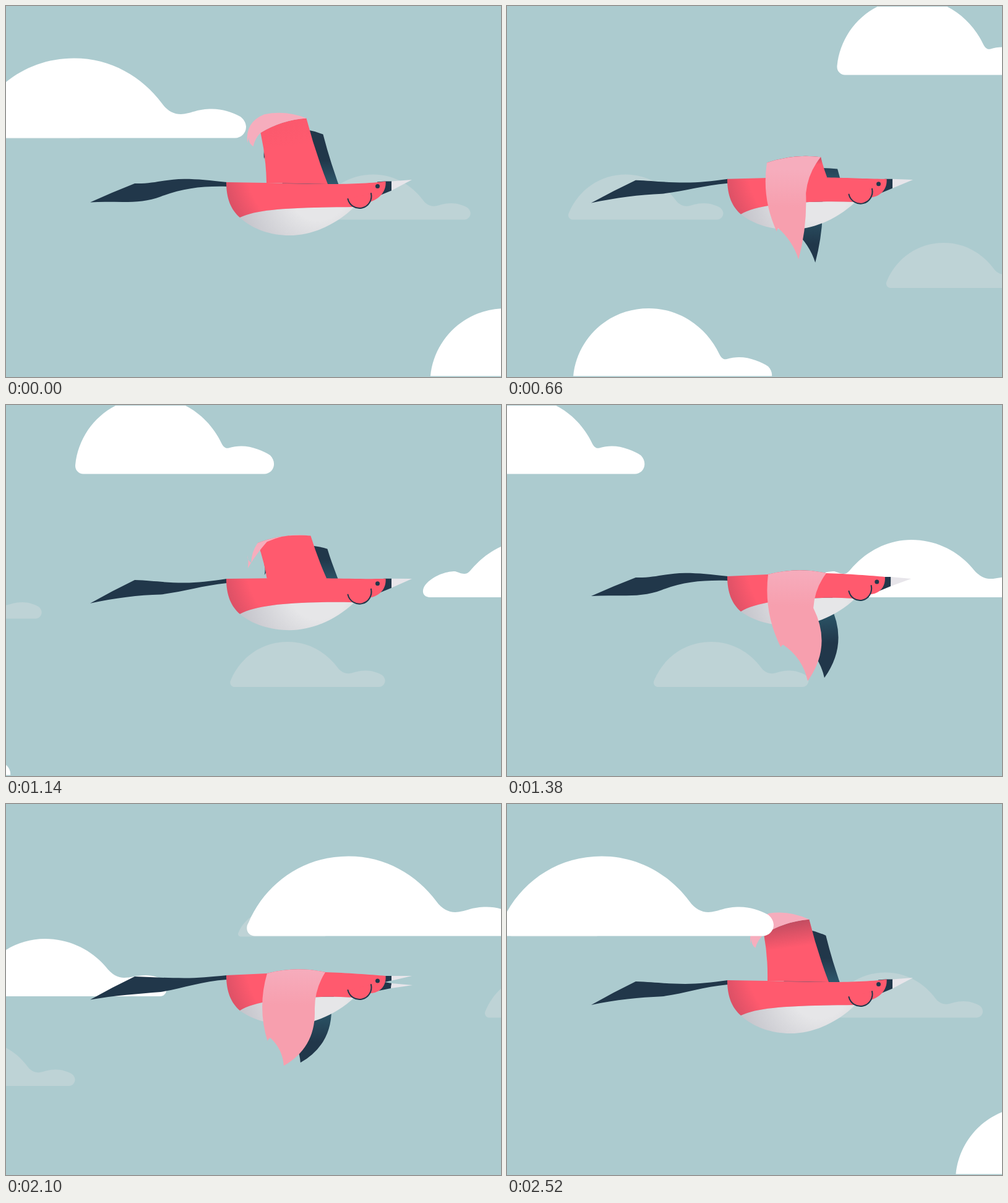
Write an HTML page that moves like this. It is 800 by 600 pixels and loops after 2550 ms.

```html
<!DOCTYPE html>
<html lang="en">
<head>
<meta charset="utf-8">
<title>Flying bird</title>
<style>
html, body { margin: 0; width: 100%; height: 100%; overflow: hidden; background: #accbcf; }
svg { display: block; width: 100vw; height: 100vh; }
</style>
</head>
<body>
<svg viewBox="0 0 800 600" xmlns="http://www.w3.org/2000/svg">
  <defs>
    <clipPath id="sky"><rect y="1" width="800" height="597.5"/></clipPath>
    <path id="long" d="M14 129C3 129-3 118 3 108C30 45 90 0 165 0C225 0 275 30 307 73C317 87 330 92 343 90C357 88 365 82 388 82C405 82 420 87 433 94C438 97 443 104 443 111C443 121 435 129 425 129Z"/>
    <path id="round" d="M13 124C5 124-1 117 0 109C6 50 55 0 122 0C172 0 215 30 236 74C240 82 244 83 248 82C254 80 262 79 268 79C286 79 305 87 315 94C319 98 321 103 321 108C321 117 314 124 305 124Z"/>
    <path id="twin" d="M-165 93C-178 93-180 80-170 70C-155 55-135 51-125 51C-118 52-108 60-100 50C-75 20-40 0 0 0C42 0 77 20 98 45C108 58 118 63 128 63C138 63 150 59 163 59C175 59 187 63 193 68C200 75 198 93 186 93Z"/>
    <radialGradient id="bodyRed" gradientUnits="userSpaceOnUse" cx="520" cy="250" r="185">
      <stop offset=".72" stop-color="#ff5a6e"/><stop offset="1" stop-color="#cf4d63"/>
    </radialGradient>
    <radialGradient id="bellyGrey" gradientUnits="userSpaceOnUse" cx="505" cy="300" r="134">
      <stop offset=".35" stop-color="#e6e6e8"/><stop offset="1" stop-color="#c3c3ca"/>
    </radialGradient>
    <linearGradient id="farNavy" gradientUnits="userSpaceOnUse" x1="0" y1="225" x2="0" y2="385">
      <stop offset=".15" stop-color="#21374a"/><stop offset=".42" stop-color="#2f5c70"/>
      <stop offset=".7" stop-color="#2b5567"/><stop offset="1" stop-color="#21374a"/>
    </linearGradient>
    <linearGradient id="topPink" gradientUnits="userSpaceOnUse" x1="0" y1="265" x2="0" y2="325">
      <stop offset="0" stop-color="#f6adbd"/><stop offset="1" stop-color="#f79fae"/>
    </linearGradient>
    <linearGradient id="foldShade" x1="0" y1="0" x2=".15" y2="1">
      <stop offset="0" stop-color="#a3465a"/><stop offset=".5" stop-color="#a3465a" stop-opacity="0"/>
    </linearGradient>
  </defs>
  <rect width="800" height="600" fill="#accbcf"/>
  <g id="back" clip-path="url(#sky)"></g>
  <g id="bird"></g>
  <g id="front" clip-path="url(#sky)"></g>
</svg>
<script>
const LOOP = 2550, STEP = 30, FLAP = 845, WAG = 450;
const NS = 'http://www.w3.org/2000/svg';
const NAVY = '#21374a', RED = '#ff5a6e', PALE = '#bed3d6', WHITE = '#fff';

function make(parent, tag, attrs) {
  const el = document.createElementNS(NS, tag);
  set(el, attrs);
  return document.getElementById(parent).appendChild(el);
}
function set(el, attrs) { for (const k in attrs) el.setAttribute(k, attrs[k]); }

const mix = (a, b, k) => a + (b - a) * k;
const mixPoint = (p, q, k) => [mix(p[0], q[0], k), mix(p[1], q[1], k)];
const mod = (a, n) => ((a % n) + n) % n;
const clamp = u => Math.min(1, Math.max(0, u));
const smooth = u => (u = clamp(u), u * u * (3 - 2 * u));
const speedUp = u => u * u;
const slowDown = u => 1 - (1 - u) ** 2;
// rises to 1 at a, falls from b
const pulse = (t, a, b, ramp) => smooth((t - a + ramp) / ramp) * smooth((b + ramp - t) / ramp);

// Clouds drift left at a steady speed and come round again; near ones take a longer lap
function cloud(layer, shape, fill, scale, y, x, speed) {
  const el = make(layer, 'use', { href: '#' + shape, fill });
  const span = speed * (layer === 'front' ? LOOP + 15 : LOOP), margin = 450;
  return t => {
    const left = mod(x - speed * t + margin, span) - margin;
    set(el, { transform: `translate(${left.toFixed(2)} ${y}) scale(${scale})` });
  };
}
const clouds = [
  cloud('back', 'long', PALE, .566, 272.5, 500, .608),
  cloud('back', 'long', PALE, .566, 383, 957, .522),
  cloud('back', 'long', PALE, .326, 172.5, 2227, .882),
  cloud('back', 'twin', WHITE, 1, 218, 1785, .82),
  cloud('front', 'round', WHITE, 1, 489, 686, .877),
  cloud('front', 'round', WHITE, 1, -12.5, 1113, .878),
  cloud('front', 'long', WHITE, 1, 84.5, -55, .954)
];

// Key poses. fold: ends of the crease; tip: crest, long feather, notch, short feather
const root = [[422, 274], [516, 272]];
const lift = { low: 0, shade: 1, fold: [[416, 212], [489, 188]],
  tip: [[425, 177], [394, 227], [396, 219], [402, 234]] };
const high = { low: 0, shade: -4, fold: [[392, 175], [470, 154]],
  tip: [[385, 168], [373, 196], [378, 183], [389, 198]] };
const sweep = { low: 1, shade: 0, fold: root,
  tip: [[501, 336], [429, 411], [417, 373], [412, 379]] };
const reach = { low: 1, shade: 1, fold: root,
  tip: [[495, 328], [487, 447], [447, 388], [443, 392]] };

// lag > 1 lets the feathers trail behind the fold
const stages = [
  { at: 0, pose: lift, ease: smooth, lag: 1 },
  { at: 90, pose: high, ease: smooth, lag: 1 },
  { at: 135, pose: high, ease: speedUp, lag: 1.6 },
  { at: 400, pose: sweep, ease: slowDown, lag: 1 },
  { at: 585, pose: reach, ease: smooth, lag: 1.6 },
  { at: FLAP, pose: lift }
];

function wingPose(t) {
  const s = (t + 25) % FLAP;
  const i = stages.findIndex(g => g.at > s), from = stages[i - 1], to = stages[i];
  const k = from.ease((s - from.at) / (to.at - from.at)), late = k ** from.lag;
  const a = from.pose, b = to.pose;
  return {
    low: mix(a.low, b.low, k),
    shade: clamp(mix(a.shade, b.shade, k)),
    fold: a.fold.map((p, n) => mixPoint(p, b.fold[n], k)),
    tip: a.tip.map((p, n) => mixPoint(p, b.tip[n], late))
  };
}

const part = fill => make('bird', 'path', { fill });
const far = part('url(#farNavy)'), tail = part(NAVY), collar = part(NAVY), beak = part('#e7e5ea');
const belly = part('url(#bellyGrey)'), body = part('url(#bodyRed)');
const smile = make('bird', 'path', { fill: RED, stroke: NAVY, 'stroke-width': 2, 'stroke-linecap': 'round' });
const eye = make('bird', 'ellipse', { fill: NAVY, rx: 3.5 });
const under = part(RED), shade = part('url(#foldShade)'), over = part('url(#topPink)');

// Curve from a to b, bowed sideways by a share of its length
function bow(a, b, k) {
  const dx = b[0] - a[0], dy = b[1] - a[1];
  const n = [a[0] + dx / 2 - dy * k, a[1] + dy / 2 + dx * k, ...b];
  return 'Q' + n.map(v => v.toFixed(2)).join(' ');
}

function wingPaths({ low, fold: [f1, f2], tip: [crest, long, notch, short] }, a, b) {
  const crease = bow(f1, f2, -.12);
  return {
    inner: `M${a}${bow(a, f1, .05)}${crease}${bow(f2, b, .03)}Z`,
    outer: `M${f2}${bow(f2, crest, .15)}${bow(crest, long, mix(.38, -.3, low))}` +
      bow(long, notch, .2 * low) + bow(notch, short, .3) + bow(short, f1, -.15) + crease + 'Z'
  };
}

function drawWings(pose) {
  const { low } = pose;
  const a = mixPoint([421, 286], root[0], low), b = mixPoint([520, 288], root[1], low);
  const near = wingPaths(pose, a, b);
  set(under, { d: near.inner });
  set(shade, { d: near.inner, opacity: pose.shade });
  set(over, { d: near.outer });

  const move = dy => p => [p[0] + 27, p[1] + dy];
  const base = move(mix(26, 16, low)), end = move(mix(26, -5, low));
  const other = wingPaths({ low, fold: pose.fold.map(base), tip: pose.tip.map(end) }, base(a), base(b));
  set(far, { d: other.inner + other.outer });
}

function drawTail(t, r) {
  const wave = peak => Math.cos((t - peak) / WAG * 2 * Math.PI);
  const d = .5 + 6 * wave(240), tip = 36 + 4 * wave(265), m = 24 + 3 * wave(320);
  const sag = Math.max(d, 0), elbow = r + 2;
  set(tail, { d: `M357 ${r}C330 ${r + d * .6} 310 ${r + d} 288 ${r + d}
    C258 ${r + d} 238 ${elbow + 1} 208 ${elbow}
    Q172 ${mix(elbow, r + tip, .46)} 136 ${r + tip}
    C175 ${r + tip - 3 - sag * .9} 215 ${r + m + 8 - 1.1 * d} 250 ${r + m}
    C285 ${r + m - 9 + .8 * d} 316 ${r + 6 + sag * .8} 357 ${r + 7}Z` });
}

function drawBody(low, r, hx, hy) {
  const v = (up, down) => mix(up, down, low);
  const side = r + 57, edge = v(325, 313), bottom = v(371, 357), sy = v(307, 296);
  const line = `C${v(470, 490)} ${v(326, 309)} ${v(410, 406)} ${v(327, 315)} 378 ${side}`;
  set(body, { d: `M356 ${r}L${v(421, 422)} ${v(286, 274)}
    C450 ${v(287, 267)} 492 ${v(288, 267)} ${v(520, 516)} ${v(288, 272)}
    C550 ${v(288, 273)} 590 ${v(287, 276)} ${613.5 + hx} ${hy}
    C${615 + hx} ${hy + 15} ${605 + hx} ${hy + 28} ${588 + hx * .6} ${sy + 10}
    L563 ${edge}${line}C364 ${r + 45} 356 ${r + 27} 356 ${r}Z` });
  set(belly, { d: `M563 ${edge}${line}C398 ${mix(side, bottom, .66)} 428 ${bottom} 458 ${bottom}
    C497 ${bottom} 535 ${mix(edge, bottom, .59)} 563 ${edge}Z` });
  const right = 590 + hx / 2;
  set(smile, { d: `M552.5 ${sy + 5}A${(right - 552.5) / 2} 19 0 0 0 ${right} ${sy - 4}` });
}

function drawFace(hx, hy, open, lid) {
  const x = n => n + hx, tipY = 281 - 3 * open, split = hy + 7.5;
  const lowTop = split + 4.5 * open, lowEnd = hy + 15 + 5 * open;
  set(collar, { d: `M${x(600)} ${hy + 1}L${x(612)} ${hy}L${x(623.3)} ${hy}V${split}L${x(612)} ${hy + 10}
    L${x(623.3)} ${lowTop}L${x(623 - open)} ${lowEnd}L${x(600)} ${hy + 24.5}Z` });
  set(beak, { d: `M${x(623)} ${hy}L${x(656)} ${tipY}L${x(623)} ${split + .2}Z
    M${x(623)} ${lowTop}L${x(656 + open)} ${tipY + 15 * open}L${x(623 - open)} ${lowEnd}Z` });
  set(eye, { cx: x(600.5), cy: hy + 8 - (1 - lid) * 2, ry: 3.5 * lid });
}

function draw(ms) {
  const t = Math.floor(ms % LOOP / STEP) * STEP;
  const pose = wingPose(t), { low } = pose;
  const r = mix(285, 277, low), hx = -12 * pulse(t, 1560, 1740, 260), hy = mix(283.5, 278, low);
  clouds.forEach(drift => drift(t));
  drawTail(t, r);
  drawBody(low, r, hx, hy);
  drawFace(hx, hy, pulse(t, 1890, 2160, 120), 1 - .85 * pulse(t, 420, 430, 50));
  drawWings(pose);
}

let start;
function tick(now) {
  if (start === undefined) start = now;
  draw(Math.max(0, now - start));
  requestAnimationFrame(tick);
}
draw(0);
requestAnimationFrame(tick);
</script>
</body>
</html>
```
